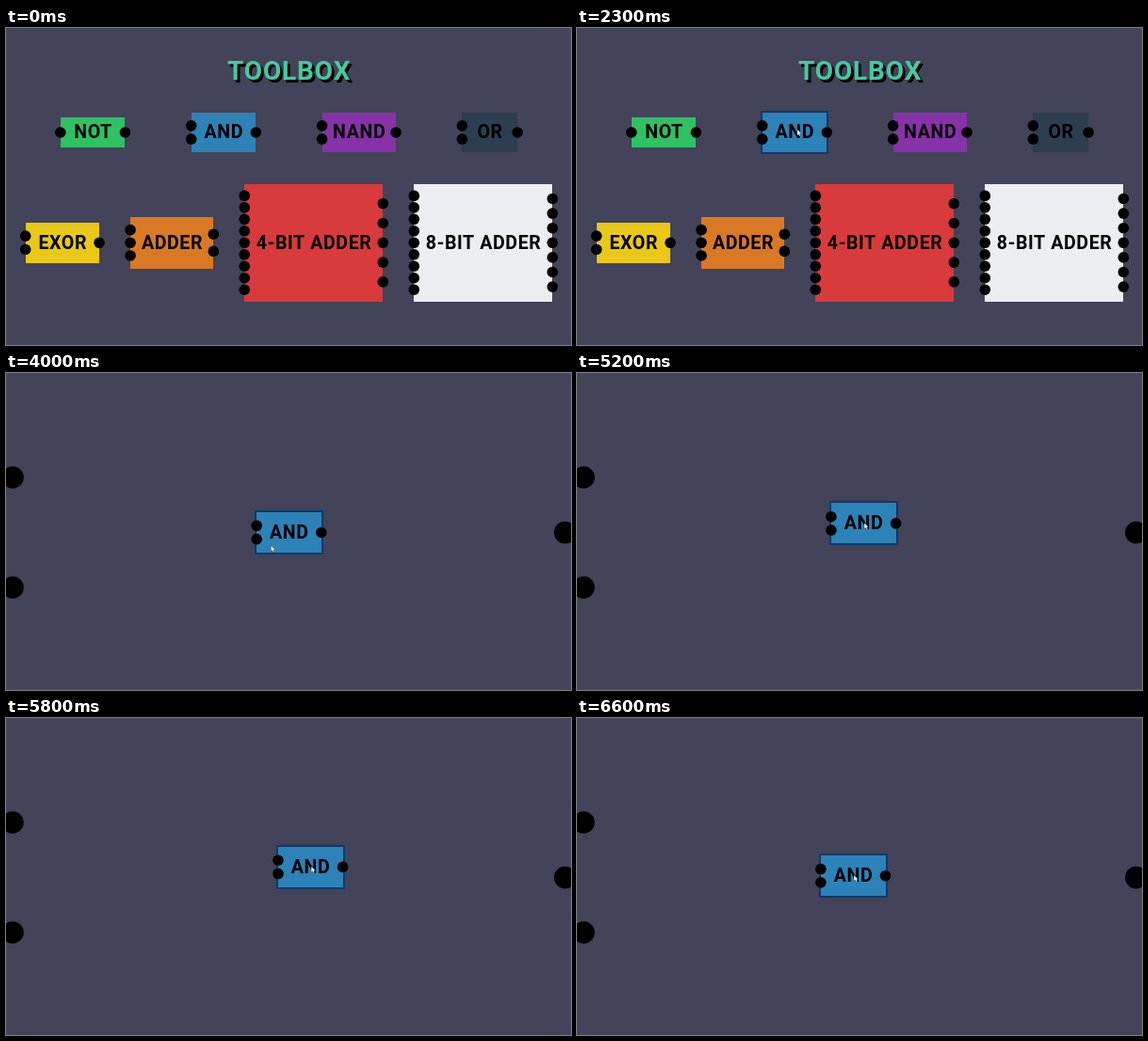
Animation, 600 px wide and 337 px high, one loop 6700 ms. Source, as an HTML page with a canvas:

```html
<!DOCTYPE html>
<html lang="en">
<head>
<meta charset="utf-8">
<title>Toolbox</title>
<style>
html, body { margin: 0; width: 100%; height: 100%; overflow: hidden; background: #434359; }
canvas { display: block; width: 600px; height: 337px; }
</style>
</head>
<body>
<canvas id="stage"></canvas>
<script>
const W = 600, H = 337, LOOP = 6700, TICK = 100;
const OPEN_AT = 2600, CENTER_X = 300.5;
const canvas = document.getElementById('stage');
const ctx = canvas.getContext('2d');
const dpr = window.devicePixelRatio || 1;
canvas.width = W * dpr;
canvas.height = H * dpr;
ctx.scale(dpr, dpr);

// A chip's width follows its label, its height the number of inputs.
const chip = (label, color, inputs, outputs) => ({
  label, color, inputs, outputs,
  w: 39.2 + 9.8 * label.length,
  h: 19.5 + 11.7 * inputs
});

function row(chips, midY, gap) {
  const total = chips.reduce((sum, c) => sum + c.w + gap, -gap);
  let x = CENTER_X - total / 2;
  for (const c of chips) {
    c.x = x;
    c.y = midY - c.h / 2;
    x += c.w + gap;
  }
  return chips;
}

const and = chip('AND', '#2d82b7', 2, 1);
const toolbox = [
  ...row([
    chip('NOT', '#2fc163', 1, 1),
    and,
    chip('NAND', '#8732a8', 2, 1),
    chip('OR', '#2c3e50', 2, 1)
  ], 111, 70.3),
  ...row([
    chip('EXOR', '#e9c817', 2, 1),
    chip('ADDER', '#d97924', 3, 2),
    chip('4-BIT ADDER', '#d93a3c', 9, 5),
    chip('8-BIT ADDER', '#ecedf0', 9, 7)
  ], 228.3, 33)
];
const placed = row([{ ...and }], 169.5, 0)[0];

const rest = [433, 37], grab = [234, 108], drop = [301.5, 169];
const swing = [grab, [180, 190], [275, 205], drop];
const dragStart = 4600, dragStep = 250;
const dragKeys = [[0, 0], [2, -4], [7.5, -12], [-2, -2], [10, 14],
  [24, -16], [12.5, -17.5], [-11, -10], [-7.3, -1.8]];

const clamp = (v, lo, hi) => Math.max(lo, Math.min(hi, v));

function ease(t, from, to) {
  const u = clamp((t - from) / (to - from), 0, 1);
  return u * u * (3 - 2 * u);
}

const blend = (a, b, u) => a.map((v, i) => v + (b[i] - v) * u);

// Bezier curve by repeated blending of neighbours.
function bezier(pts, u) {
  if (pts.length === 1) return pts[0];
  return bezier(pts.slice(1).map((p, i) => blend(pts[i], p, u)), u);
}

// Smooth curve through evenly timed keys (Catmull-Rom).
function through(keys, pos) {
  const last = keys.length - 1;
  const at = clamp(pos, 0, last);
  const i = Math.min(Math.floor(at), last - 1);
  const u = at - i;
  const key = n => keys[clamp(n, 0, last)];
  const [a, b, c, d] = [key(i - 1), key(i), key(i + 1), key(i + 2)];
  return [0, 1].map(k => b[k] + u / 2 * (c[k] - a[k] +
    u * (2 * a[k] - 5 * b[k] + 4 * c[k] - d[k] +
    u * (3 * (b[k] - c[k]) + d[k] - a[k]))));
}

function dot(x, y, r) {
  ctx.beginPath();
  ctx.arc(x, y, r, 0, Math.PI * 2);
  ctx.fill();
}

function text(str, x, y, size, color) {
  const spacing = size * 0.03;
  ctx.font = `bold ${size}px Roboto, "Liberation Sans", sans-serif`;
  ctx.letterSpacing = `${spacing}px`;
  ctx.textAlign = 'center';
  ctx.fillStyle = color;
  ctx.fillText(str, x + spacing / 2, y);
}

function pins(c, x, count) {
  for (let i = 1; i <= count; i++) dot(x, c.y + c.h * i / (count + 1), 5.8);
}

function box(c, grow, color) {
  const left = Math.round(c.x), top = Math.round(c.y);
  const right = Math.round(c.x + c.w), bottom = Math.round(c.y + c.h);
  ctx.fillStyle = color;
  ctx.fillRect(left - grow, top - grow, right - left + 2 * grow, bottom - top + 2 * grow);
}

function drawChip(c, active) {
  if (active) box(c, 1.8, '#0b386c');
  box(c, 0, c.color);
  ctx.fillStyle = '#000';
  pins(c, c.x, c.inputs);
  pins(c, c.x + c.w, c.outputs);
  text(c.label, c.x + c.w / 2, c.y + c.h / 2 + 6.2, 19.6, '#000');
}

function drawCursor([x, y]) {
  ctx.beginPath();
  ctx.moveTo(x, y);
  ctx.lineTo(x, y + 6);
  ctx.lineTo(x + 1.4, y + 4.8);
  ctx.lineTo(x + 2.4, y + 7);
  ctx.lineTo(x + 3.3, y + 6.6);
  ctx.lineTo(x + 2.4, y + 4.4);
  ctx.lineTo(x + 4.2, y + 4.3);
  ctx.closePath();
  ctx.lineWidth = 0.9;
  ctx.strokeStyle = '#222230';
  ctx.stroke();
  ctx.fillStyle = '#f4f4f8';
  ctx.fill();
}

const inside = (c, [x, y]) => x >= c.x && x <= c.x + c.w && y >= c.y && y <= c.y + c.h;

function drawToolbox(t) {
  const cursor = blend(rest, grab, ease(t, 1400, 2200));
  text('TOOLBOX', 303, 57.5, 28, '#000');
  text('TOOLBOX', 300.2, 54.7, 28, '#45c9a2');
  for (const c of toolbox) drawChip(c, inside(c, cursor));
  if (t >= TICK) drawCursor(cursor);
}

function drawBoard(t) {
  const [dx, dy] = through(dragKeys, (t - dragStart) / dragStep);
  const [cx, cy] = bezier(swing, ease(t, 3200, 4300));
  const cursor = [cx + dx, cy + dy];
  const c = { ...placed, x: placed.x + dx, y: placed.y + dy };
  ctx.fillStyle = '#000';
  dot(7, 111, 11.8);
  dot(7, 228, 11.8);
  dot(593.8, 169.6, 11.8);
  drawChip(c, inside(c, cursor));
  drawCursor(cursor);
}

const start = performance.now();
function frame() {
  const elapsed = (performance.now() - start) % LOOP;
  const t = Math.floor(elapsed / TICK) * TICK;
  ctx.fillStyle = '#434359';
  ctx.fillRect(0, 0, W, H);
  (t < OPEN_AT ? drawToolbox : drawBoard)(t);
  requestAnimationFrame(frame);
}
frame();
</script>
</body>
</html>
```
